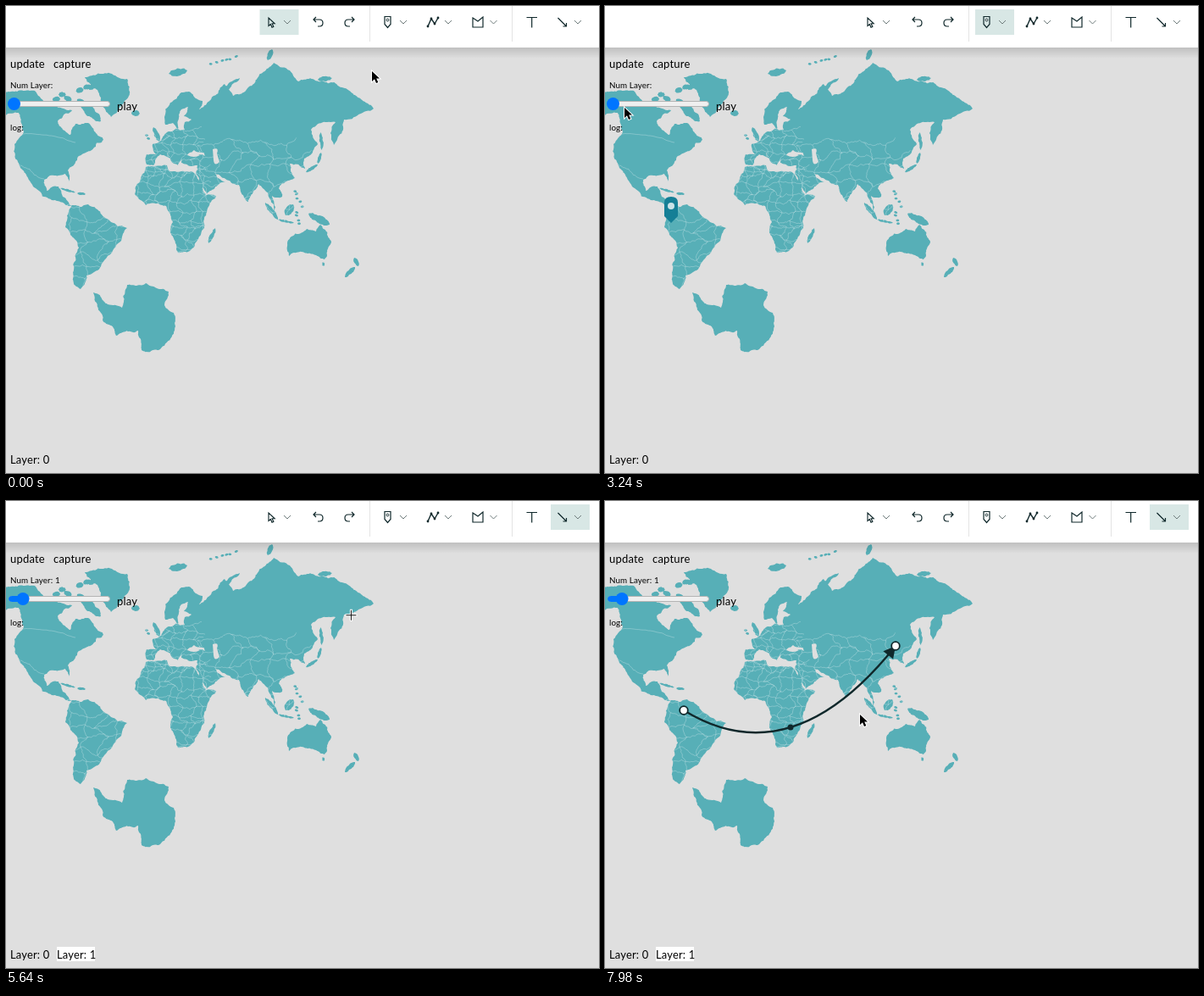
Recreate the animation shown at these times as an HTML page with a canvas. Size 700 by 551 pixels, loop 8 s.

```html
<!DOCTYPE html>
<html lang="en">
<head>
<meta charset="utf-8">
<title>Map sketch tools</title>
<style>
  html, body { margin: 0; width: 100%; height: 100%; overflow: hidden; background: #dfdfdf; }
  canvas { display: block; width: 700px; height: 551px; }
</style>
</head>
<body>
<canvas id="stage" width="700" height="551"></canvas>
<script>
const ctx = document.getElementById('stage').getContext('2d');
const LOOP = 8000, STEP = 60;
const SEA = '#dfdfdf', LAND = '#57afb7', INK = '#10282b', SELECTED = '#d8e7e5', HOVER = '#f1f4f3';

// ---------- helpers ----------
let seed = 7;
const random = () => (seed = seed * 16807 % 2147483647) / 2147483647;
const jitter = size => (random() - .5) * size;
const mix = (a, b, k) => a + (b - a) * k;
const points = text => text.split(' ').map(pair => pair.split(',').map(Number));

function line(d, color = INK, width = 1.2, dash = []) {
  ctx.strokeStyle = color;
  ctx.lineWidth = width;
  ctx.setLineDash(dash);
  ctx.stroke(new Path2D(d));
  ctx.setLineDash([]);
}
function fill(d, color) {
  ctx.fillStyle = color;
  ctx.fill(new Path2D(d));
}
function box(x, y, w, h, color) {
  ctx.fillStyle = color;
  ctx.fillRect(x, y, w, h);
}
function bar(x, y, w, h, color, edge) {
  ctx.beginPath();
  ctx.roundRect(x, y, w, h, 3);
  ctx.fillStyle = color;
  ctx.fill();
  ctx.strokeStyle = edge;
  ctx.lineWidth = 1;
  ctx.stroke();
}
function dot(x, y, r, color, edge = color, width = 0.01) {
  ctx.beginPath();
  ctx.arc(x, y, r, 0, Math.PI * 2);
  ctx.fillStyle = color;
  ctx.fill();
  ctx.strokeStyle = edge;
  ctx.lineWidth = width;
  ctx.stroke();
}
function label(text, x, y, size = 13, weight = 400) {
  ctx.font = `${weight} ${size}px Lato, sans-serif`;
  ctx.letterSpacing = size > 11 ? '0.2px' : '0.1px';
  ctx.fillStyle = '#000';
  ctx.fillText(text, x, y);
}
function shadowBox(x, y, w, h, color, blur) {
  ctx.save();
  ctx.shadowColor = 'rgba(0,0,0,.26)';
  ctx.shadowBlur = blur;
  ctx.shadowOffsetY = 4;
  box(x, y, w, h, color);
  ctx.restore();
}

// ---------- world map ----------
// Joins two points by repeatedly pushing the midpoint sideways.
function roughEdge(path, [x0, y0], [x1, y1], rough) {
  const length = Math.hypot(x1 - x0, y1 - y0);
  if (length < 2.5) return path.lineTo(x1, y1);
  const push = jitter(rough);
  const middle = [(x0 + x1) / 2 - (y1 - y0) * push, (y0 + y1) / 2 + (x1 - x0) * push];
  roughEdge(path, [x0, y0], middle, rough);
  roughEdge(path, middle, [x1, y1], rough);
}
function roughShape(corners, rough = .28) {
  const path = new Path2D();
  path.moveTo(...corners[0]);
  corners.forEach((corner, i) => roughEdge(path, corner, corners[(i + 1) % corners.length], rough));
  return path;
}

const world = new Path2D(), borders = new Path2D();
const coast = text => world.addPath(roughShape(points(text)));

// A rough oval between two ends.
function island(x0, y0, x1, y1, width) {
  const angle = Math.atan2(y1 - y0, x1 - x0), half = Math.hypot(x1 - x0, y1 - y0) / 2;
  const rim = Array.from({ length: 8 }, (_, i) => {
    const a = i * Math.PI / 4, u = Math.cos(a) * half, v = Math.sin(a) * width / 2;
    return [(x0 + x1) / 2 + u * Math.cos(angle) - v * Math.sin(angle),
            (y0 + y1) / 2 + u * Math.sin(angle) + v * Math.cos(angle)];
  });
  world.addPath(roughShape(rim));
}
function islets(x0, y0, x1, y1, count, size) {
  for (let i = 0; i < count; i++) {
    const x = mix(x0, x1, i / (count - 1)) + jitter(size), y = mix(y0, y1, i / (count - 1)) + jitter(size);
    island(x - size / 2, y, x + size / 2, y + jitter(size), size * .7);
  }
}
// Country borders: the walls of an uneven brick pattern.
function countries(x, y, columns, rows, cell) {
  const corner = Array.from({ length: rows + 1 }, (_, r) => Array.from({ length: columns + 1 }, (_, c) =>
    [x + (c + r % 2 / 2) * cell + jitter(cell * .6), y + r * cell * .8 + jitter(cell * .6)]));
  const wall = (a, b) => {
    borders.moveTo(...a);
    roughEdge(borders, a, b, .4);
  };
  for (let r = 0; r < rows; r++)
    for (let c = 0; c < columns; c++) {
      wall(corner[r][c], corner[r][c + 1]);
      wall(corner[r][c], corner[r + 1][c]);
    }
}

coast('-50,118 -35,100 10,101 34,100 46,114 78,123 61,136 76,152 82,139 97,138 113,156 106,166 86,177 73,194 75,207 70,198 45,205 48,218 62,213 67,225 78,236 58,229 32,213 11,180 10,163 21,148 15,126');
coast('93,84 125,80 143,86 145,106 124,131 113,118 108,99');
coast('78,235 97,234 123,254 143,262 136,277 118,298 108,312 95,318 88,334 80,328 86,285 70,261');
coast('165,190 190,188 192,194 222,197 236,223 248,224 234,250 234,262 217,289 203,291 195,269 197,255 189,236 165,235 152,222 153,213');
coast('166,187 166,175 177,175 173,163 190,149 211,146 211,137 219,134 210,130 215,119 207,122 203,145 197,138 188,140 187,131 207,102 232,112 228,122 245,110 245,160 235,174 222,170 213,178 203,188 190,173 197,183 182,175 174,188');
coast('240,112 258,92 268,106 285,97 316,67 345,89 400,97 434,121 399,134 387,164 383,150 389,137 360,146 368,163 352,180 353,192 335,186 341,203 322,215 326,225 314,224 317,242 303,215 298,210 286,231 275,211 247,198 259,208 237,222 224,197 226,188 207,185 209,178 235,177');
coast('332,280 355,263 366,266 371,258 384,278 376,299 356,292 334,295');
coast('103,338 120,352 137,356 143,329 165,327 192,337 187,353 198,362 200,378 180,406 160,406 156,383 130,389 114,370');

island(174, 143, 181, 160, 6);
island(148, 126, 158, 127, 7);
island(192, 80, 214, 76, 9);
island(251, 103, 276, 85, 5);
island(309, 64, 314, 51, 6);
island(368, 87, 385, 85, 6);
island(247, 262, 239, 280, 5);
island(354, 196, 368, 187, 4);
island(368, 186, 372, 173, 4);
island(371, 149, 373, 170, 4);
island(306, 232, 321, 252, 5);
island(321, 252, 340, 256, 3);
island(330, 247, 339, 234, 9);
island(357, 245, 382, 258, 9);
island(411, 297, 416, 307, 5);
island(400, 320, 412, 308, 5);
island(64, 215, 82, 220, 3);
island(84, 221, 94, 222, 3);
island(84, 110, 112, 136, 12);
island(104, 157, 115, 158, 8);
islets(243, 67, 270, 60, 6, 4);
islets(52, 113, 100, 96, 7, 9);
islets(342, 220, 349, 236, 5, 4);
islets(343, 243, 346, 257, 4, 4);
islets(168, 152, 169, 157, 2, 4);
islets(374, 304, 375, 305, 2, 3);

countries(160, 144, 6, 6, 12);
countries(152, 190, 7, 11, 13);
countries(228, 160, 6, 6, 20);
countries(70, 234, 4, 7, 19);
borders.moveTo(20, 151);
roughEdge(borders, [20, 151], [82, 161], .1);
borders.moveTo(16, 188);
roughEdge(borders, [16, 188], [45, 204], .3);

function drawWorld() {
  box(0, 0, 700, 551, SEA);
  ctx.save();
  ctx.fillStyle = LAND;
  ctx.fill(world);
  ctx.clip(world);
  ctx.strokeStyle = 'rgba(225,240,242,.45)';
  ctx.lineWidth = .7;
  ctx.stroke(borders);
  ctx.restore();
  // Black Sea and Caspian Sea
  fill('M214 176Q217 169 229 176Q222 180 214 176ZM244 169Q252 166 249 174L252 184Q246 190 245 182Z', SEA);
}

// ---------- timeline ----------
const POINT_OPEN = 780, POINT_PICKED = 1260, PIN_AT = 2100, GRAB = 3420, LAYER_AT = 3600,
      NOTE_OPEN = 4380, NOTE_CLOSE = 4680, ARROW_OPEN = 4800, ARROW_PICKED = 5400,
      DRAW_FROM = 5940, DRAW_TO = 6600, BEND_FROM = 6960, BEND_TO = 7500, LAG = 80;
const during = (t, from, to) => t >= from && t < to;

// Pointer stops: when and where.
const stops = [
  [0, 432, 77], [POINT_OPEN, 452, 22], [960, 444, 47], [POINT_PICKED, 446, 50],
  [PIN_AT, 78, 255], [2640, 78, 255], [3240, 23, 120], [GRAB, 10, 116], [LAYER_AT, 20, 116],
  [NOTE_OPEN, 622, 22], [4560, 637, 23], [ARROW_OPEN, 658, 21], [5160, 659, 45], [ARROW_PICKED, 659, 45],
  [DRAW_FROM, 93, 247], [6400, 287, 192], [6480, 319, 188], [DRAW_TO, 343, 171],
  [BEND_FROM, 218, 209], [BEND_TO, 219, 267], [7920, 301, 252], [LOOP, 301, 252]
];
function pointerAt(t) {
  const i = stops.findIndex(stop => stop[0] > t);
  const [t0, x0, y0] = stops[i - 1], [t1, x1, y1] = stops[i];
  const k = (t - t0) / (t1 - t0);
  return [mix(x0, x1, k), mix(y0, y1, k)];
}

// ---------- map drawings ----------
function drawPin() {
  fill('M70 232Q70 225 78 225Q86 225 86 232V248L78 256L70 248Z', '#157f96');
  dot(78, 236, 4, '#c9e3e8');
}
function drawArrow(t) {
  const start = pointerAt(DRAW_FROM);
  const end = pointerAt(Math.min(DRAW_TO, Math.max(DRAW_FROM, t - LAG)));
  const straight = start.map((v, i) => (v + end[i]) / 2);
  const middle = t < BEND_FROM ? straight : pointerAt(Math.min(t, BEND_TO));
  const control = middle.map((v, i) => 2 * v - straight[i]);
  line(`M${start}Q${control} ${end}`, INK, 2.4);
  ctx.save();
  ctx.translate(...end);
  ctx.rotate(Math.atan2(end[1] - control[1], end[0] - control[0]));
  fill('M0 0L-14 -7.5V7.5Z', INK);
  ctx.restore();
  dot(...middle, 3.5, INK);
  for (const handle of [start, end]) dot(...handle, 4.8, '#fff', INK, 1.8);
}

// ---------- interface ----------
const CURSOR = 'M0 0V12L3 9.3L5 14L7.3 13L5.2 8.5H9Z';
const chevron = (x, up) => line(up ? `M${x - 4} 21l4 -4l4 4` : `M${x - 4} 17l4 4l4 -4`, '#6f7c7c', 1);

function pinIcon(x, y) {
  line(`M${x - 3.5} ${y - 6}h7v9l-3.5 4l-3.5 -4z`);
  dot(x, y - 2, 1.4, '#fff', INK, 1);
}
function arrowIcon(x, y, both) {
  line(`M${x - 5} ${y - 5}l10 10m-4 0h4v-4`);
  if (both) line(`M${x - 1} ${y - 5}h-4v4`);
}
function drawToolbar(t) {
  const shade = ctx.createLinearGradient(0, 49, 0, 62);
  shade.addColorStop(0, 'rgba(0,0,0,.14)');
  shade.addColorStop(1, 'rgba(0,0,0,0)');
  box(0, 49, 700, 13, shade);
  box(0, 0, 700, 49, '#fff');
  for (const x of [429, 597]) box(x, 0, 1, 42, '#e4e4e4');

  const selected = t < POINT_PICKED ? 299.5 : t < ARROW_PICKED ? 437 : 643;
  box(selected, 4, 46, 30, SELECTED);
  if (during(t, NOTE_OPEN - 60, NOTE_CLOSE)) box(605, 4, 30, 30, HOVER);
  const arrowOpen = during(t, ARROW_OPEN, ARROW_PICKED);
  if (arrowOpen) {
    box(643, 4, 46, 30, HOVER);
    line('M643.5 34V4.5H688.5V34', '#b5d3d2', 1);
  }

  ctx.save();
  ctx.translate(310, 14);
  ctx.scale(.8, .8);
  line(CURSOR, INK, 1.4);
  ctx.restore();
  line('M366 13l-3 3l3 3M363 16h7q4 0 4 4t-4 4h-2');
  line('M408 13l3 3l-3 3M411 16h-7q-4 0 -4 4t4 4h2');
  pinIcon(450.5, 18.5);
  line('M498 24L502 15L506 21L510 14', INK, 1.4);
  for (const [x, y] of points('498,24 502,15 506,21 510,14')) dot(x, y, 1.4, INK);
  line('M551 14L557 18L563 13V25H551Z');
  line('M614.5 13.5H627M620.7 13.5V25.5');
  arrowIcon(656.5, 19);
  for (const x of [332, 522, 575.5]) chevron(x);
  chevron(469, during(t, POINT_OPEN, POINT_PICKED));
  chevron(675, arrowOpen);
}
function drawPanel(t) {
  const layered = t >= LAYER_AT;
  const knob = t < GRAB ? 9.5 : pointerAt(Math.min(t, LAYER_AT))[0];
  label('update', 5, 73);
  label('capture', 56, 73);
  label(layered ? 'Num Layer: 1' : 'Num Layer:', 5, 97, 9.8);
  bar(3.5, 112.5, 119, 6, '#efefef', '#b4b4b4');
  if (layered) bar(3.5, 112.5, knob - 3, 6, '#0075ff', '#0075ff');
  dot(knob, 115.5, 7.5, '#0075ff');
  label('play', 131, 123);
  label('log:', 5, 147, 9.8);
  label('Layer: 0', 5, 539.5, 12.9);
  if (layered) {
    box(60, 526, 45, 17, '#fff');
    label('Layer: 1', 60, 539.5, 12.9);
  }
}

// ---------- tooltips ----------
const WATER = '#cacaca', SHORE = '#e8e8e8';
function tooltip(x, y, h, title, rows, picture) {
  shadowBox(x, y, 304, h, '#e9eded', 18);
  ctx.save();
  ctx.translate(x + 23, y + 23);
  ctx.beginPath();
  ctx.rect(0, 0, 258, 145);
  ctx.clip();
  picture();
  ctx.restore();
  label(title, x + 23, y + 210, 14, 900);
  rows.forEach((row, i) => label(row, x + 23, y + 238 + i * 15, 12));
}

const shores = [
  '55,0 50,20 65,42 92,25 122,40 137,37 142,66 148,44 170,32 203,44 212,28 235,22 258,30 258,0',
  '258,46 206,56 222,62 208,70 228,79 212,86 246,112 224,118 258,128',
  '0,83 9,76 11,95 40,103 42,116 70,121 150,115 164,123 130,145 0,145'
].map(text => roughShape(points(text), .2));
function bayPicture() {
  box(0, 0, 258, 145, WATER);
  ctx.fillStyle = SHORE;
  for (const shore of shores) ctx.fill(shore);
  line('M10 0L25 43L66 73L128 84L160 73L178 94L175 111L155 145', '#e6e6e6', 1, [6, 3]);
  dot(84, 37, 1, '#666');
}
function worldPicture() {
  box(0, 0, 258, 145, WATER);
  ctx.fillStyle = SHORE;
  for (const shift of [0, -309]) {
    ctx.save();
    ctx.translate(71 + shift, -48);
    ctx.scale(.63, .63);
    ctx.fill(world);
    ctx.restore();
  }
  dot(184, 49, 1, '#777');
}
function riverPicture() {
  box(0, 0, 258, 145, '#e4e4e4');
  line('M12 -6Q42 16 71 18Q112 24 135 44Q162 63 174 103Q182 128 200 128Q230 125 264 112', WATER, 16);
  fill('M178 108Q190 116 220 119L258 104V127Q225 131 204 145H191Z', WATER);
  line('M66 24Q60 42 64 65Q62 90 74 110Q82 128 50 148', WATER, 9);
  line('M138 -3Q142 12 153 22Q164 38 160 65', WATER, 7);
  line('M260 12Q249 25 253 42Q238 62 246 84Q254 96 255 112', WATER, 5);
  line('M0 26Q12 18 20 4', WATER, 3);
  dot(71, 17, 1.6, '#c8c8c8', '#888', 1);
}
function dropdown(x, firstColor) {
  shadowBox(x, 34, 46, 61, '#fff', 10);
  box(x, 34, 46, 31, firstColor);
}
function drawPopups(t) {
  if (during(t, POINT_OPEN, POINT_PICKED)) {
    if (t >= POINT_OPEN + 120)
      tooltip(124, 34, 263, 'Add a point', ['Hold Shift to add multiple points at once'], bayPicture);
    dropdown(437, '#dfeae8');
    pinIcon(452.5, 49);
    dot(453, 80, 6.5, '#fff', INK, 1.2);
    label('1', 450.5, 83, 8.5, 700);
  }
  if (during(t, NOTE_OPEN, NOTE_CLOSE))
    tooltip(410.5, 43, 278, 'Add an annotation',
      ['Click and drag from the diamond-shaped', 'handles to create a leader line'], worldPicture);
  if (during(t, ARROW_OPEN, ARROW_PICKED)) {
    if (t >= ARROW_OPEN + 240) tooltip(330, 34, 236, 'Draw an arrow', [], riverPicture);
    dropdown(643, HOVER);
    arrowIcon(658, 49);
    arrowIcon(658, 80, true);
  }
}

// ---------- cursor ----------
function drawCursor(t) {
  const [x, y] = pointerAt(t);
  const placing = during(t, POINT_PICKED, 2640) || during(t, ARROW_PICKED, DRAW_TO + 60);
  ctx.save();
  ctx.translate(x, y);
  if (placing && y > 49) {
    line('M-7 0H7M0 -7V7', '#fff', 3);
    line('M-6 0H6M0 -6V6', '#111', 1);
  } else if (during(t, ARROW_OPEN + 120, ARROW_PICKED)) {
    const hand = 'M-1 1Q0 -1 2 1L4 6L6 5L8 6L10 6Q12 8 11 12L9 16H3L-3 10Q-3 7 0 8Z';
    fill(hand, '#fff');
    line(hand, '#111', 1.2);
    line('M4 6l1 3M7 6l1 3', '#111', .8);
  } else {
    line(CURSOR, '#fff', 2);
    fill(CURSOR, '#000');
  }
  ctx.restore();
}

const begun = performance.now();
function frame() {
  const t = Math.floor((performance.now() - begun) % LOOP / STEP) * STEP;
  drawWorld();
  if (during(t, PIN_AT, LAYER_AT)) drawPin();
  if (t > DRAW_FROM) drawArrow(t);
  drawToolbar(t);
  drawPanel(t);
  drawPopups(t);
  drawCursor(t);
  requestAnimationFrame(frame);
}
frame();
</script>
</body>
</html>
```
